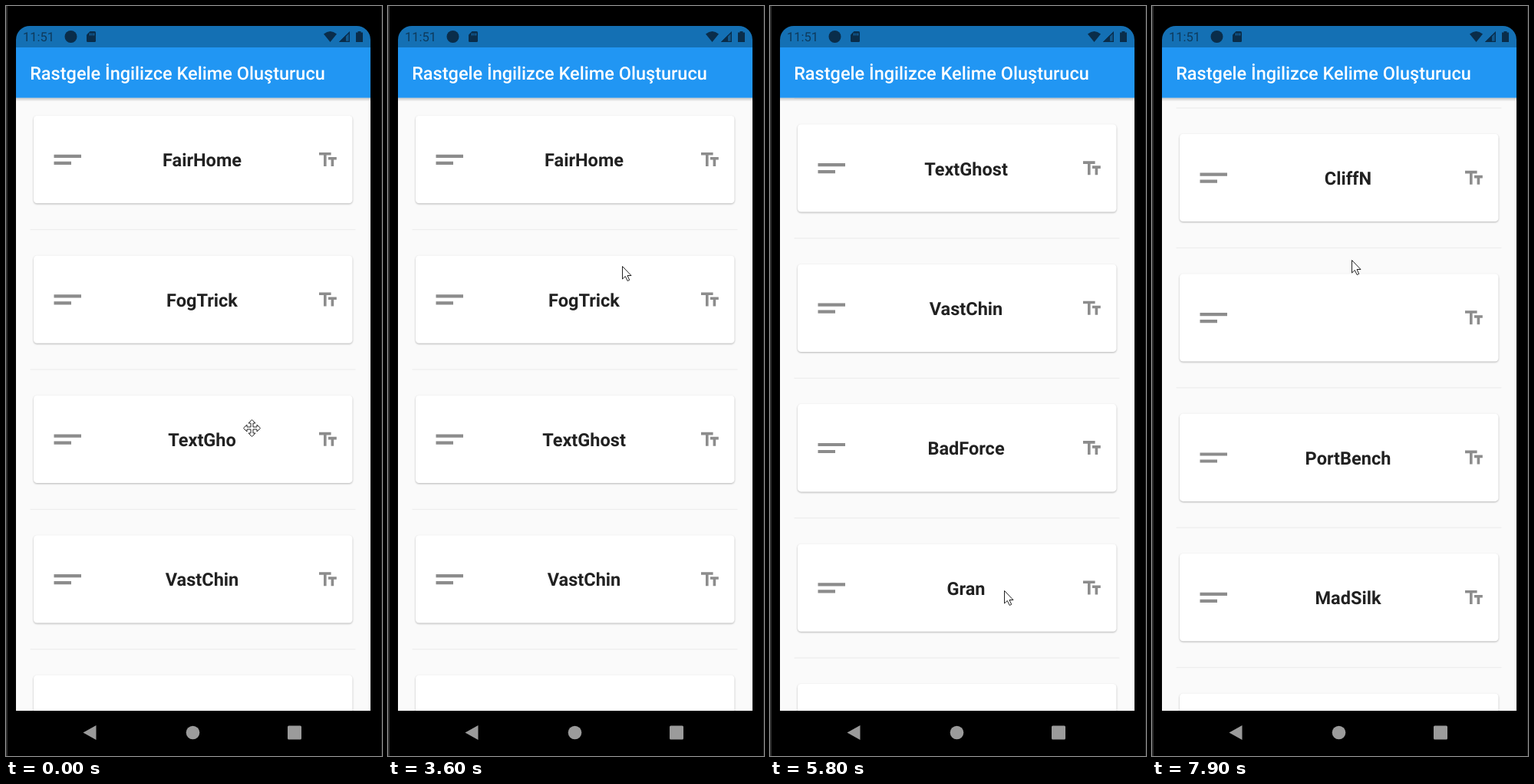
An HTML page that plays this animation: 490 by 978 pixels, repeating every 8 s.

```html
<!DOCTYPE html>
<html lang="tr">
<head>
<meta charset="utf-8">
<title>Kelime listesi</title>
<style>
  html, body { margin: 0; width: 100%; height: 100%; overflow: hidden; background: #000; }
  svg { display: block; width: 490px; height: 978px; font-family: Roboto, sans-serif; text-rendering: geometricPrecision; }
  .card { fill: #fff; filter: drop-shadow(0 1px 1px rgba(0, 0, 0, .28)); }
  .divider { fill: #ededed; }
  .icon { fill: #8c8c8c; }
  .word { font-size: 23.53px; font-weight: 700; fill: #212121; text-anchor: middle; }
  .title { font-size: 23.53px; font-weight: 500; fill: #fff; }
  .status { fill: #0a2d4a; }
  .clock { font-size: 16.5px; fill: #0e3a5c; }
  .nav { fill: #9b9b9b; }
  .pointer { fill: #fff; stroke: #222; stroke-linejoin: round; }
</style>
</head>
<body>
<svg viewBox="0 0 490 978" xmlns="http://www.w3.org/2000/svg">
  <defs>
    <clipPath id="viewport"><rect x="13" y="119" width="462" height="800"/></clipPath>
    <linearGradient id="shade" x2="0" y2="1">
      <stop stop-color="#000" stop-opacity=".22"/>
      <stop offset="1" stop-color="#000" stop-opacity="0"/>
    </linearGradient>
  </defs>
  <rect width="490" height="978"/>
  <rect width="2" height="978" fill="#303030"/>
  <rect x="489" width="1" height="978" fill="#222"/>
  <rect x="13" y="119" width="462" height="800" fill="#fafafa"/>

  <g clip-path="url(#viewport)"><g id="list"></g></g>

  <rect x="13" y="119.5" width="462" height="5" fill="url(#shade)"/>
  <path d="M13 54V44a18 18 0 0 1 18-18H457a18 18 0 0 1 18 18V54z" fill="#1470b4"/>
  <rect x="13" y="54" width="462" height="65.7" fill="#2196f3"/>
  <text class="title" x="31.2" y="96">Rastgele İngilizce Kelime Oluşturucu</text>

  <text class="clock" x="22" y="46">11:51</text>
  <g class="status">
    <circle cx="84.5" cy="40" r="8"/>
    <path d="M109.5 33H115.5a1.5 1.5 0 0 1 1.5 1.5V45.5a1.5 1.5 0 0 1-1.5 1.5H106.5a1.5 1.5 0 0 1-1.5-1.5V37.5z"/>
    <path d="M109.5 35.5v3M112 35.5v3M114.5 35.5v3" stroke="#1470b4" stroke-width="1.2"/>
    <path d="M414 36.5Q422.5 29.5 431 36.5L422.5 47z"/>
    <path d="M448 33V47H434z" fill-opacity=".35"/>
    <path d="M443 38V47H434z"/>
    <path d="M447.3 34.5V46.3H435.5z" fill="none" stroke="#0a2d4a" stroke-width="1.3"/>
    <path d="M458.5 34.5V33H462.5V34.5H465V47H456V34.5z"/>
  </g>

  <g class="nav">
    <path d="M100.500 947.500L117.500 938V957z"/>
    <circle cx="243.500" cy="947.500" r="8.800"/>
    <rect x="367" y="938.500" width="18" height="18" rx="1.500"/>
  </g>

  <path id="arrow" class="pointer" d="M0 0V16.500L3.800 13L6.700 19L9.200 17.800L6.500 12H11.500z"/>
  <path id="mover" class="pointer" transform="translate(320.500 550.500)"/>
</svg>
<script>
const LOOP = 8000, STEP = 100, PITCH = 182.4;
const LETTER_MS = 40, PAUSE_MS = 1000, REPEATS = 3;

// Each word with the times at which its typing starts anew.
const items = [
  ['FairHome'], ['FogTrick'], ['TextGhost', -3020, 5280], ['VastChin', 5190],
  ['BadForce'], ['GrandBrick', 4220], ['ShortFan', 3630], ['WristString', 3665],
  ['HelpCure', 3850, 5870], ['CreamSmile', 4250, 5960], ['PotBirth', 4370, 6060],
  ['CalmTrace', 4520, 6180], ['CliffNoon', 6290], ['DrumRiver', 6520],
  ['PortBench', 6780], ['MadSilk', 6920], ['NightShow', 7050]
];

// [time, value, ...]; a trailing true marks a decelerating fling.
const scrollKeys = [
  [3600, 0], [3680, 220], [4150, 540, true], [4400, 800], [4500, 919.8],
  [4950, 1130, true], [5100, 1130], [5350, 640], [5800, 353.5, true],
  [5850, 353.5], [6100, 837], [6600, 1339.5, true], [6650, 1339.5],
  [6900, 1666], [7700, 2165, true]
];
const xKeys = [[2500, 306], [3600, 305.5], [4150, 309], [4400, 312.5], [5100, 312.5],
  [5350, 305.5], [5850, 305.5], [6100, 270], [6500, 243.5], [6650, 243.5], [6900, 260.5]];
const yKeys = [[2500, 550], [3300, 339.5], [3600, 339.5], [3680, 256], [4150, 590],
  [4400, 255.5], [5100, 255.5], [5350, 762.5], [5850, 762.5], [6100, 280],
  [6500, 652.5], [6650, 652.5], [6900, 331.5]];

const byId = id => document.getElementById(id);
const list = byId('list'), arrow = byId('arrow'), mover = byId('mover');

list.innerHTML = items.map((_, i) => `
  <g transform="translate(0 ${i * PITCH})">
    <rect class="card" x="36" y="143" width="415.5" height="114.3" rx="4.5"/>
    <rect class="divider" x="31.5" y="291" width="424" height="1.2"/>
    <path class="icon" d="M62.5 193.8H98V198H62.5zM62.5 202.8H85V207H62.5z"/>
    <path class="icon" transform="translate(405 186.2) scale(1.2)"
      d="M2.5 4v3h5v12h3V7h5V4zM21.5 9h-9v3h3v7h3v-7h3z"/>
    <text class="word" x="255.5" y="209.3"></text>
  </g>`).join('');
const words = list.querySelectorAll('.word');

const arm = [[-1.5, -1.5], [-1.5, -6.5], [-4.5, -6.5], [0, -11], [4.5, -6.5], [1.5, -6.5]];
const turns = [([x, y]) => [x, y], ([x, y]) => [-y, x], ([x, y]) => [-x, -y], ([x, y]) => [y, -x]];
mover.setAttribute('d', 'M' + turns.flatMap(turn => arm.map(turn)).join('L') + 'z');

function valueAt(keys, t) {
  const next = keys.findIndex(key => key[0] > t);
  if (next === 0) return keys[0][1];
  if (next < 0) return keys[keys.length - 1][1];
  const [t0, from] = keys[next - 1], [t1, to, fling] = keys[next];
  const p = (t - t0) / (t1 - t0);
  return from + (to - from) * (fling ? 1 - (1 - p) ** 2 : p);
}

function typed([word, ...starts], t) {
  const start = starts.filter(s => s <= t).pop();
  if (start === undefined) return word;
  const cycle = PAUSE_MS + LETTER_MS * word.length;
  const age = t - start;
  return age >= REPEATS * cycle ? word : word.slice(0, Math.floor(age % cycle / LETTER_MS));
}

function draw(t) {
  list.setAttribute('transform', `translate(0 ${-valueAt(scrollKeys, t)})`);
  items.forEach((item, i) => { words[i].textContent = typed(item, t); });
  arrow.setAttribute('transform', `translate(${valueAt(xKeys, t)} ${valueAt(yKeys, t)})`);
  arrow.style.display = t < 2500 ? 'none' : '';
  mover.style.display = t < 2500 ? '' : 'none';
}

const begin = performance.now();
function tick() {
  const t = (performance.now() - begin) % LOOP;
  draw(Math.floor(t / STEP) * STEP);
  requestAnimationFrame(tick);
}
tick();
</script>
</body>
</html>
```
